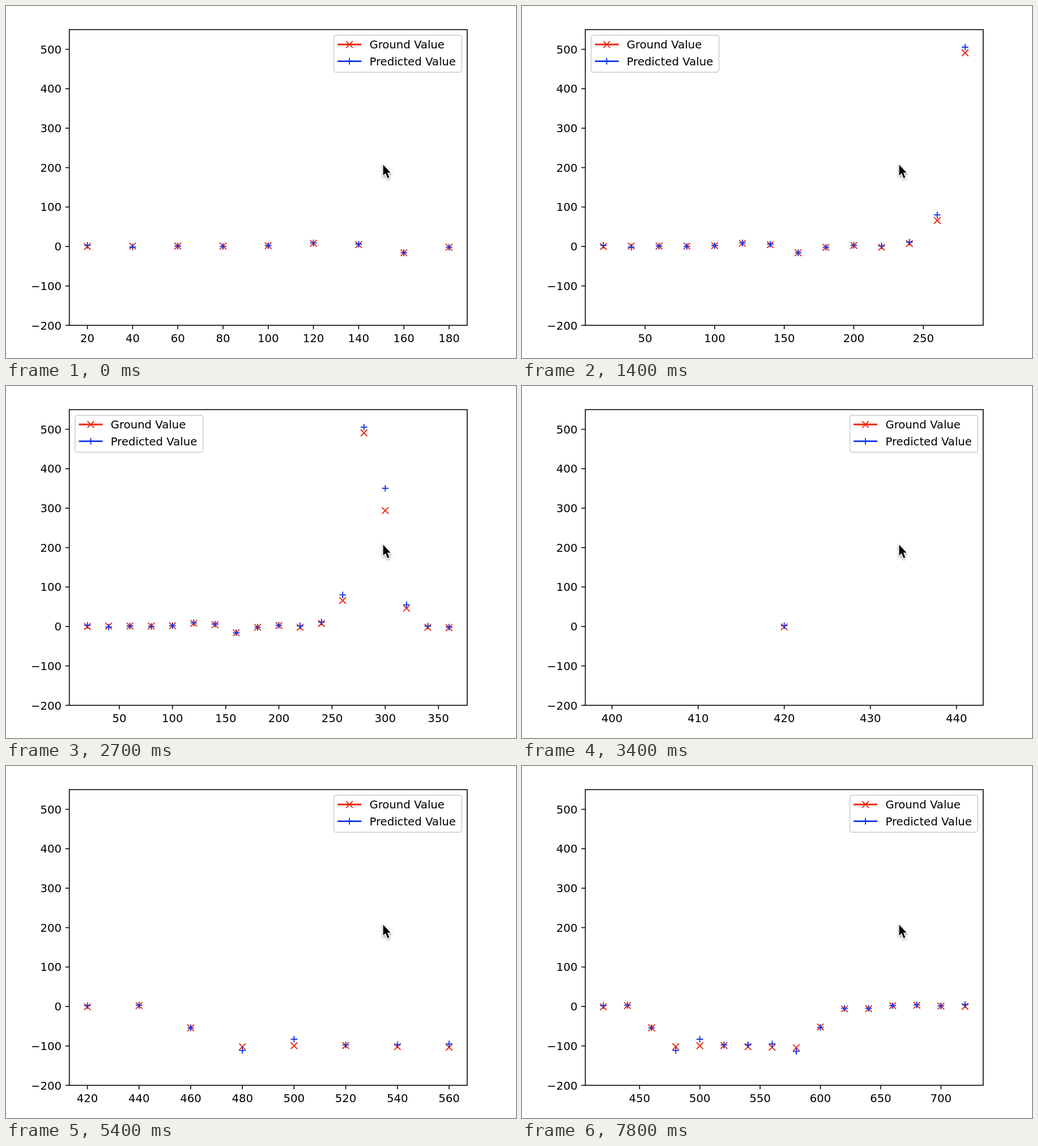
An HTML page with a canvas for the animation above (8 s loop, 900 by 622 pixels).

```html
<!DOCTYPE html>
<html lang="en">
<head>
<meta charset="utf-8">
<title>Ground and predicted values</title>
<style>
  html, body { margin: 0; width: 100%; height: 100%; overflow: hidden; background: #fff; }
  canvas { display: block; }
</style>
</head>
<body>
<canvas id="plot" width="900" height="622"></canvas>
<script>
const ctx = document.getElementById('plot').getContext('2d');
const LOOP = 8000;
const BOX = { left: 111.7, right: 813.8, top: 41.7, bottom: 564.3 };
const EM = 19.67;
const RED = '#ec260c', BLUE = '#1033e8';

// One value per 20 steps on the x axis, starting at 20.
const ground = [
  0, 1, 1, 1, 2, 8, 4.5, -16, -2, 2.5, -2, 7.5, 66, 491, 294, 46, -2, -3, 0, 1,
  -1, 2, -54, -102, -99.5, -99, -102, -103.5, -104.5, -52, -6, -5.5, 2, 3, 1, 0
];
const predicted = [
  3, -1.5, 1, 0, 2, 9, 6, -16, -2, 3, 1.5, 11, 80, 505.5, 350.5, 55, 1, -1.5, 1, 1,
  2, 3, -54, -111.5, -83, -97.5, -97, -95, -114, -53, -5, -5, 2, 4, 1.5, 5
];

// The newest x value at time t; a point arrives about every 300 ms.
function newest(t) {
  if (t >= 4500) return 500 + 20 * Math.floor((t - 4500) / 300);
  if (t >= 1600) return 300 + 20 * Math.floor((t - 1600) / 300);
  return 180 + 20 * [300, 600, 900, 1100, 1400].filter(s => t >= s).length;
}

function xRange(first, last) {
  if (first === last) { first *= 0.95; last *= 1.05; }
  const pad = (last - first) * 0.05;
  return [first - pad, last + pad];
}

function tickStep(span) {
  const raw = span / 9;
  const power = 10 ** Math.floor(Math.log10(raw));
  return power * [1, 2, 2.5, 5, 10].find(m => m * power >= raw - 1e-9);
}

const yPos = v => BOX.bottom - (v + 200) / 750 * (BOX.bottom - BOX.top);

function line(color, width, ...points) {
  ctx.strokeStyle = color;
  ctx.lineWidth = width;
  ctx.beginPath();
  for (const [x1, y1, x2, y2] of points) {
    ctx.moveTo(x1, y1);
    ctx.lineTo(x2, y2);
  }
  ctx.stroke();
}

function text(str, x, y, align) {
  ctx.fillStyle = '#000';
  ctx.textAlign = align;
  ctx.fillText(str, x, y);
}

const MARK = 5.8;
function cross(x, y) {
  line(RED, 1.85, [x - MARK, y - MARK, x + MARK, y + MARK], [x - MARK, y + MARK, x + MARK, y - MARK]);
}
function plus(x, y) {
  line(BLUE, 1.85, [x - MARK, y, x + MARK, y], [x, y - MARK, x, y + MARK]);
}

function drawAxes(lo, hi, xPos) {
  const { left, right, top, bottom } = BOX;
  ctx.strokeStyle = '#000';
  ctx.lineWidth = 1.57;
  ctx.strokeRect(left, top, right - left, bottom - top);

  for (let v = -200; v <= 500; v += 100) {
    const y = yPos(v);
    line('#000', 1.57, [left - 6.9, y, left, y]);
    text(String(v).replace('-', '\u2212'), left - 13.8, y + 7.2, 'right');
  }

  const step = tickStep(hi - lo);
  const digits = step % 1 ? 1 : 0;
  for (let v = Math.ceil(lo / step) * step; v <= hi; v += step) {
    const x = xPos(v);
    line('#000', 1.57, [x, bottom, x, bottom + 6.9]);
    text(v.toFixed(digits), x, 593.8, 'center');
  }
}

function drawLegend(x) {
  ctx.beginPath();
  ctx.roundRect(x, 51.7, 225.8, 65.3, 3.9);
  ctx.fillStyle = '#fff';
  ctx.fill();
  ctx.strokeStyle = '#d6d6d6';
  ctx.lineWidth = 1.9;
  ctx.stroke();

  const rows = [['Ground Value', 68, RED, cross], ['Predicted Value', 97.6, BLUE, plus]];
  for (const [label, y, color, mark] of rows) {
    line(color, 2.8, [x + 6.7, y, x + 48.7, y]);
    mark(x + 27.6, y);
    text(label, x + 62.9, y + 7.1, 'left');
  }
}

function drawCursor() {
  const shape = new Path2D('M665.6 280.6V299.6L669.9 295.6L673.4 304L676.4 302.7L672.9 294.6H678.6Z');
  ctx.save();
  ctx.shadowColor = 'rgba(0,0,0,.4)';
  ctx.shadowBlur = 4;
  ctx.shadowOffsetY = 2;
  ctx.strokeStyle = '#fff';
  ctx.lineWidth = 2.4;
  ctx.stroke(shape);
  ctx.restore();
  ctx.fillStyle = '#000';
  ctx.fill(shape);
}

function draw(t) {
  const last = newest(t);
  const first = last > 400 ? 420 : 20;
  const [lo, hi] = xRange(first, last);
  const xPos = v => BOX.left + (v - lo) / (hi - lo) * (BOX.right - BOX.left);

  ctx.fillStyle = '#fff';
  ctx.fillRect(0, 0, 900, 622);
  ctx.font = `${EM}px "DejaVu Sans", sans-serif`;
  ctx.textBaseline = 'alphabetic';

  for (let v = first; v <= last; v += 20) {
    const i = v / 20 - 1;
    cross(xPos(v), yPos(ground[i]));
    plus(xPos(v), yPos(predicted[i]));
  }
  drawAxes(lo, hi, xPos);
  // The legend keeps clear of the tall peak.
  drawLegend(last >= 280 && last <= 400 ? 121.9 : 578.5);
  drawCursor();
}

function loop() {
  draw(performance.now() % LOOP);
  requestAnimationFrame(loop);
}
loop();
</script>
</body>
</html>
```
